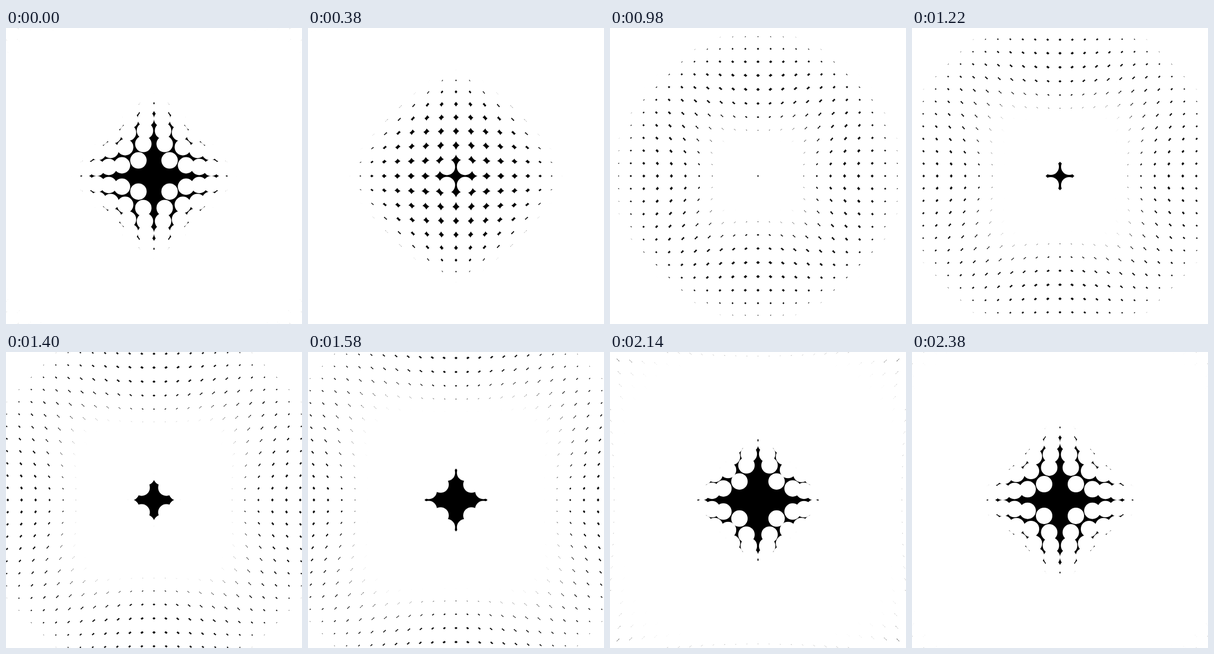
An HTML page with a canvas that plays this animation: 540x540 px, repeating every 2400 ms.

```html
<!DOCTYPE html>
<html lang="en">
<head>
<meta charset="utf-8">
<title>Radial dot wave</title>
<style>
  html, body { margin: 0; width: 100%; height: 100%; overflow: hidden; background: #000; }
  canvas { display: block; }
</style>
</head>
<body>
<canvas id="stage" width="540" height="540"></canvas>
<script>
const SIZE = 540, PERIOD = 2400;
const STEP = 20, RADIUS = 15, REACH = 350;
const PUSH = 35;                             // largest outward shift
const WAVELENGTH = SIZE / Math.SQRT2;
const START = 74 / 360;                      // phase at the centre, in turns
const ctx = document.getElementById('stage').getContext('2d');

function shift(distance, turn) {
  const phase = 2 * Math.PI * (START + turn - distance / WAVELENGTH);
  return PUSH * (1 + Math.cos(phase)) / 2;
}

function draw(now) {
  const turn = (now % PERIOD) / PERIOD;
  ctx.setTransform(1, 0, 0, 1, SIZE / 2, SIZE / 2);
  ctx.fillStyle = '#000';
  ctx.fillRect(-SIZE / 2, -SIZE / 2, SIZE, SIZE);
  ctx.fillStyle = '#fff';
  for (let x = -REACH; x <= REACH; x += STEP) {
    for (let y = -REACH; y <= REACH; y += STEP) {
      const distance = Math.hypot(x, y);
      const scale = 1 + shift(distance, turn) / distance;
      ctx.beginPath();
      ctx.arc(x * scale, y * scale, RADIUS, 0, 2 * Math.PI);
      ctx.fill();
    }
  }
}

function tick() {
  draw(performance.now());
  requestAnimationFrame(tick);
}
tick();
</script>
</body>
</html>
```
